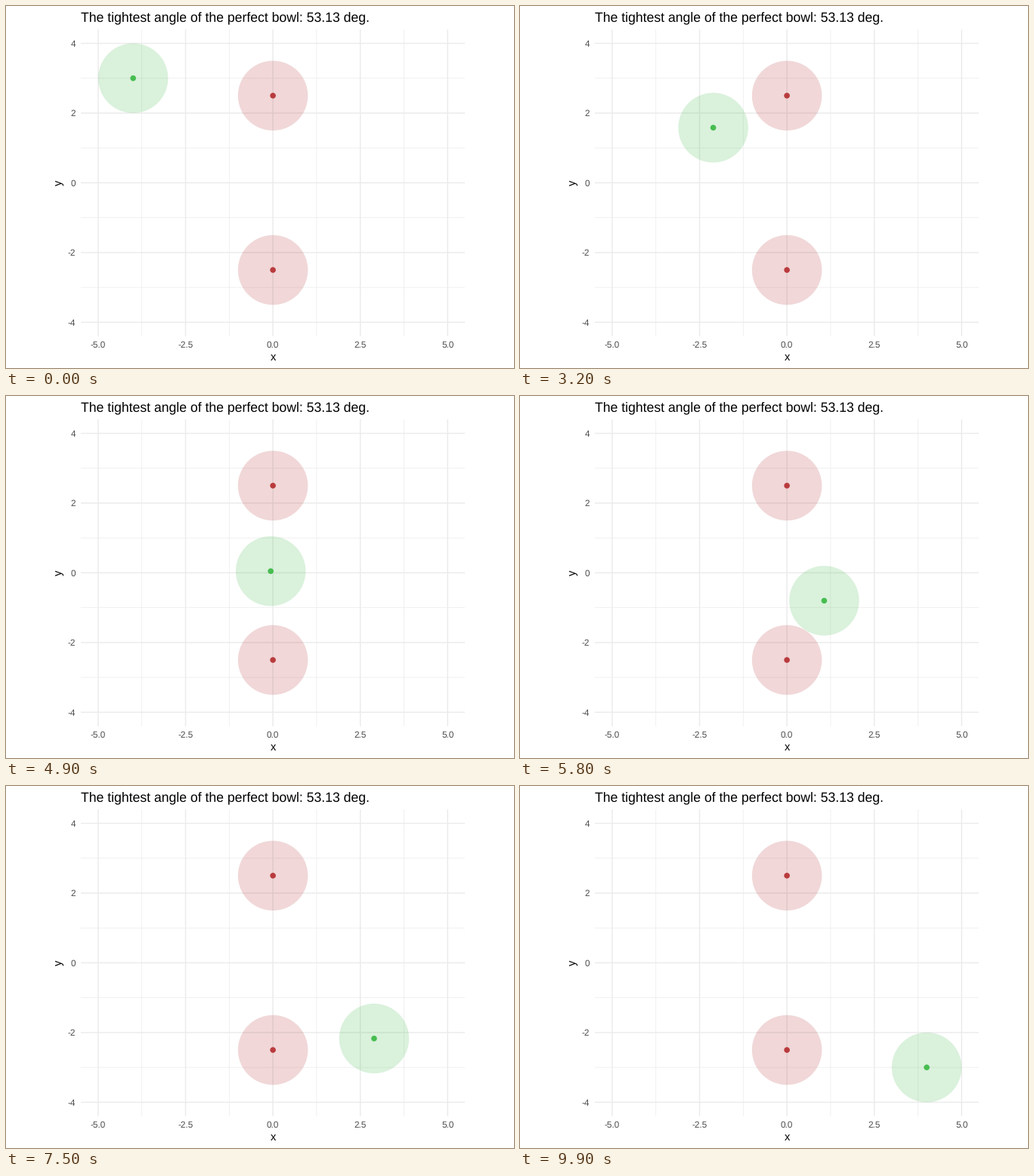
These frames come from a looping animation (672 px wide and 480 px high, 10 s). A matplotlib script:

```python
import numpy as np
import matplotlib.pyplot as plt
from matplotlib.animation import FuncAnimation
from matplotlib.patches import Circle

W, H, DPI = 672, 480, 96
FRAMES, INTERVAL = 100, 100
CX, CY, UNIT = 353.1, 234.45, 46.23   # panel centre and pixels per data unit
XMAX, YMAX = 5.5, 4.4
RED, GREEN, GRID, GREY = "#B93B3D", "#46BD50", "#EBEBEB", "#4D4D4D"

plt.rcParams["font.family"] = "Liberation Sans"
plt.rcParams["text.hinting"] = "none"

fig = plt.figure(figsize=(W / DPI, H / DPI), dpi=DPI, facecolor="white")
left, bottom = CX - XMAX * UNIT, CY + YMAX * UNIT
ax = fig.add_axes([left / W, 1 - bottom / H,
                   2 * XMAX * UNIT / W, 2 * YMAX * UNIT / H])
ax.set(xlim=(-XMAX, XMAX), ylim=(-YMAX, YMAX))
ax.axis("off")


def label(x, y, text, size, **kw):
    """Place text with its baseline at pixel (x, y), measured from top left."""
    fig.text(x / W, 1 - y / H, text, fontsize=size, va="baseline", **kw)


def grid(xs, ys, width):
    style = dict(color=GRID, lw=width * 72 / DPI, snap=False,
                 solid_capstyle="butt", zorder=1)
    for x in xs:
        ax.axvline(x, **style)
    for y in ys:
        ax.axhline(y, **style)


def ball(x, y, color):
    """A translucent unit disc with a solid centre dot."""
    disc = Circle((x, y), 1, fc=color, alpha=0.2, lw=0, zorder=2)
    dot = Circle((x, y), 3.8 / UNIT, fc=color, lw=0, zorder=3)
    for part in (disc, dot):
        ax.add_patch(part)
    return disc, dot


x_ticks = np.arange(-5, 5.1, 2.5)
y_ticks = range(-4, 5, 2)
grid(np.arange(-3.75, 4, 2.5), range(-3, 4, 2), 0.71)
grid(x_ticks, y_ticks, 1.42)

for x in x_ticks:
    label(CX + x * UNIT, 453, f"{x:.1f}", 8.8, color=GREY, ha="center")
for y in y_ticks:
    label(left - 6.6, CY - y * UNIT + 4.2, f"{y}", 8.8, color=GREY, ha="right")

angle = np.degrees(2 * np.arctan2(2, 4))
label(left, 20, f"The tightest angle of the perfect bowl: {angle:.2f} deg.", 13.2)
label(CX, 469.6, "x", 11, ha="center")
label(75, CY, "y", 11, ha="center", rotation=90, rotation_mode="anchor")

for y in (2.5, -2.5):
    ball(0, y, RED)
mover = ball(-4, 3, GREEN)


def update(i):
    s = np.cos(np.pi * i / (FRAMES - 1))
    for part in mover:
        part.center = (-4 * s, 3 * s)
    return mover


anim = FuncAnimation(fig, update, frames=FRAMES, interval=INTERVAL,
                     repeat=True, repeat_delay=0, blit=False)
plt.show()
```
